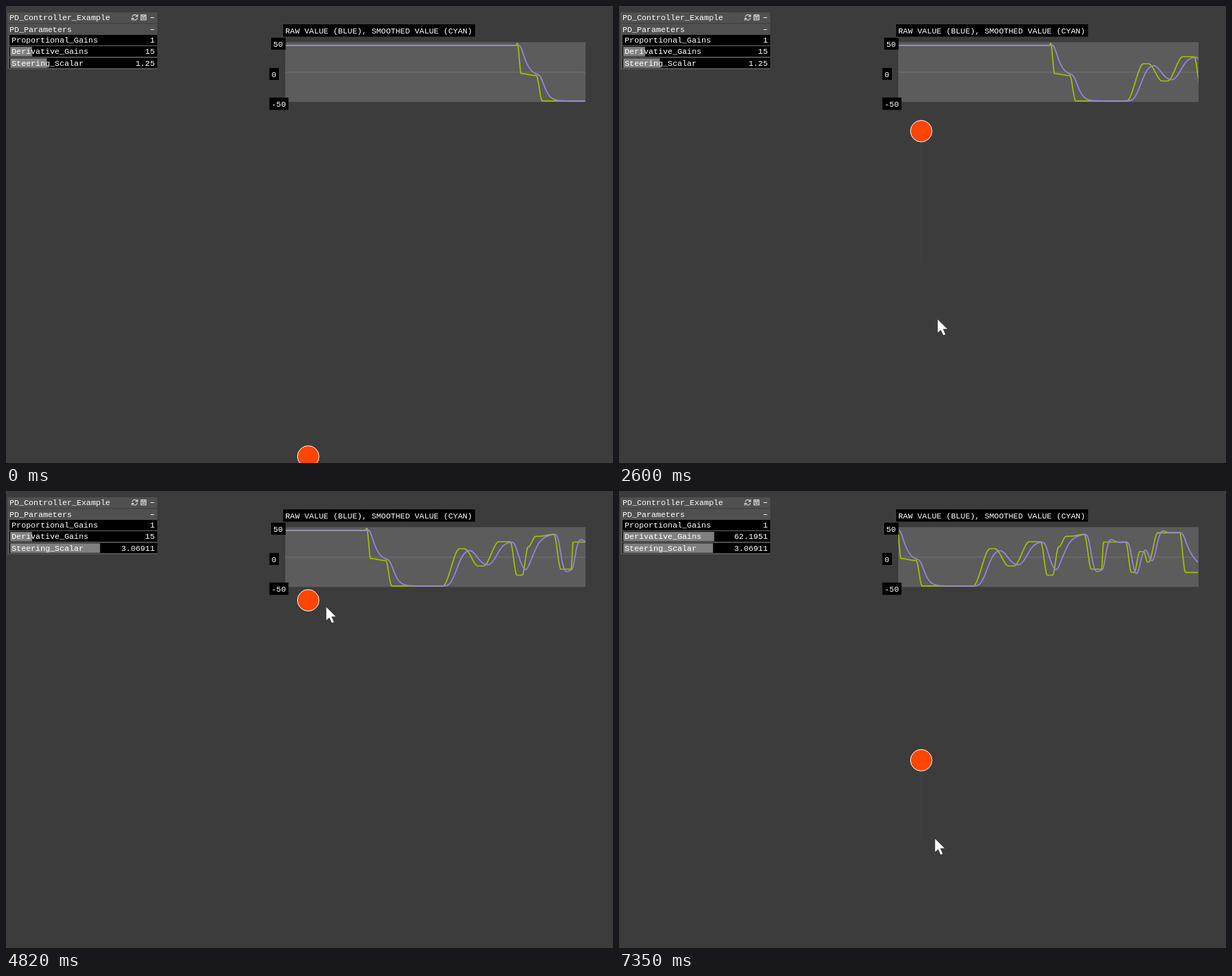
These frames come from a looping animation (863 px wide and 649 px high, 7.39 s). An HTML page:

```html
<!DOCTYPE html>
<html lang="en">
<head>
<meta charset="utf-8">
<title>PD controller</title>
<style>
html, body { margin: 0; width: 100%; height: 100%; overflow: hidden; background: #3c3c3c; }
svg { display: block; }
text { font: 11.37px "Liberation Mono", "DejaVu Sans Mono", monospace; fill: #fff; white-space: pre; }
.end { text-anchor: end; }
.icon { fill: none; stroke: #f0f0f0; stroke-width: 1.1; }
</style>
</head>
<body>
<svg width="863" height="649" viewBox="0 0 863 649">
  <defs><clipPath id="window"><rect x="397" y="51" width="426.5" height="86"/></clipPath></defs>
  <rect width="863" height="649" fill="#3c3c3c"/>

  <path id="link" stroke="#464646" fill="none"/>
  <circle id="ball" cx="429.7" r="15.3" fill="#ff4500" stroke="#fff"/>

  <rect x="397" y="51.3" width="427" height="85" fill="#fff" opacity=".164"/>
  <path d="M397 94H824" stroke="#737373"/>
  <g clip-path="url(#window)">
    <g id="curves" fill="none" stroke-width="1.7" stroke-linejoin="round">
      <path id="rawCurve" stroke="#a3c000"/>
      <path id="smoothCurve" stroke="#9a84da"/>
    </g>
  </g>
  <path d="M394 26h273v17.500h-273zM377 45h20.500v17h-20.500zM374.500 88h13.500v17h-13.500zM374.500 130h27v17.500h-27z"/>
  <text x="397" y="38.500">RAW VALUE (BLUE), SMOOTHED VALUE (CYAN)</text>
  <text x="380" y="57.500">50</text>
  <text x="377.500" y="100.500">0</text>
  <text x="377.500" y="143">-50</text>

  <rect x="2" y="9" width="213" height="81" fill="#505050"/>
  <path d="M2 24.800H215" stroke="#3c3c3c"/>
  <path d="M5 41h210v15h-210zM5 57h210v15h-210zM5 73.500h210v15h-210z"/>
  <path d="M5 56.500H215M5 72.800H215M5 89H215" stroke="#6c6c6c" stroke-width=".8"/>
  <rect id="derivativeBar" x="6" y="58" height="13.500" fill="#808080"/>
  <rect id="steeringBar" x="6" y="74.300" height="13.500" fill="#808080"/>
  <text x="5" y="19.500">PD_Controller_Example</text>
  <text x="5" y="36.500">PD_Parameters</text>
  <text x="8" y="52">Proportional_Gains</text>
  <text x="8" y="68">Derivative_Gains</text>
  <text x="8" y="84.500">Steering_Scalar</text>
  <text class="end" x="211.500" y="52">1</text>
  <text class="end" x="211.500" y="68" id="derivativeValue"></text>
  <text class="end" x="211.500" y="84.500" id="steeringValue"></text>
  <path class="icon" d="M179.500 15.500a3.600 3.600 0 0 1 6.500-1.500M187 12v3h-3M186.700 17a3.600 3.600 0 0 1-6.500 1.500M179 20.500v-3h3M192 12.700h7v7h-7zM194 13v2.500h3V13M193.500 17.500h4M205.500 16.500h5M205.500 33.500h5"/>

  <circle id="press" r="15.500" fill="#b6c22c" opacity=".72"/>
  <path id="cursor" d="M0 0V20L4.600 16L8.200 23.700L11.700 22.200L8.300 14.600H14.700Z" fill="#fff" stroke="#222" stroke-width=".7"/>
</svg>
<script>
// Time is measured in plot pixels: the plot scrolls left by one pixel per unit.
const LOOP = 7390, LEFT = 397, RIGHT = 823, END = 1156;
const TOP = 51, SCALE = 649 / 85, FLOOR = 134.8;
const CURSOR_LEAD = 1.5, BAR_LAG = 1.64;

// The recording does not scroll quite evenly: [milliseconds, pixels].
const scrollKeys = [[0, 0], [1840, 82.5], [3330, 142.5], [4200, 183.5], [5520, 248.5], [6480, 294], [7350, 331.5]];

// Mouse moves: [start, duration, plot height reached, x reached]
const rest = { level: 56, x: 452 };
const moves = [
  [725, 2, 53, 452],
  [727, 5.5, 96, 452],
  [733, 20, 98.7, 452],
  [754, 8.5, FLOOR, 452],
  [835, 24, 82, 463],
  [866, 19.5, 106.5, 463],
  [893, 22, 72, 463],
  [931, 9.5, 119.5, 450],
  [948, 8.5, 79.5, 380],
  [956.5, 11, 64.3, 77],
  [973, 20, 61.5, 133.675],
  [993, 10, 111, 424],
  [1017.5, 3, 72.5, 455],
  [1052, 8, 115.5, 450],
  [1064, 8, 86, 450],
  [1077.5, 5.5, 101, 442],
  [1084.5, 13, 59.3, 50],
  [1113, 11, 59, 135.3658],
  [1128.5, 8.5, 115.6, 449]
];
const sliders = {
  steering: { from: 973, to: 993, startX: 58, max: 5 },
  derivative: { from: 1113, to: 1124, startX: 37.2, max: 100 }
};

const clamp = f => Math.min(1, Math.max(0, f));
const ease = f => f * f * (3 - 2 * f);
const mix = (a, b, f) => a + (b - a) * f;
const stageY = level => (level - TOP) * SCALE;

function mouse(u) {
  let { level, x } = rest;
  for (const [start, duration, nextLevel, nextX] of moves) {
    const f = ease(clamp((u - start) / duration));
    level = mix(level, nextLevel, f);
    x = mix(x, nextX, f);
  }
  return { level, x };
}

function barEnd({ from, to, startX }, u) {
  const dragged = u - BAR_LAG;
  return dragged < from ? startX : mouse(Math.min(dragged, to)).x;
}

const sliderValue = (slider, u) => (barEnd(slider, u) - 6) / 208 * slider.max;

// A damped spring follows the mouse; both sliders act on it while it runs.
function simulate(dt) {
  const track = [];
  let position = rest.level, velocity = 0;
  for (let u = LEFT; u <= END; u += dt) {
    track.push(position);
    const pull = 0.0305 * sliderValue(sliders.steering, u) * (mouse(u).level - position);
    const drag = 0.0242 * sliderValue(sliders.derivative, u) * velocity;
    velocity += (pull - drag) * dt;
    position += velocity * dt;
  }
  return track;
}

const DT = 0.25;
const track = simulate(DT);

function smooth(u) {
  const at = (u - LEFT) / DT, i = Math.floor(at);
  return mix(track[i], track[i + 1], at - i);
}

function scrollAt(ms) {
  let i = 0;
  while (i < scrollKeys.length - 2 && ms >= scrollKeys[i + 1][0]) i++;
  const [t0, s0] = scrollKeys[i], [t1, s1] = scrollKeys[i + 1];
  return mix(s0, s1, clamp((ms - t0) / (t1 - t0)));
}

const el = Object.fromEntries([...document.querySelectorAll("[id]")].map(e => [e.id, e]));
const set = (name, attrs) => {
  for (const key in attrs) el[name].setAttribute(key, attrs[key]);
};
const visibility = shown => shown ? "visible" : "hidden";

function curve(levelAt) {
  const points = [];
  for (let u = LEFT; u < END - 1; u += 0.5) points.push(`${u} ${levelAt(u).toFixed(2)}`);
  return "M" + points.join("L");
}

function draw(ms) {
  const scroll = scrollAt(ms), now = RIGHT + scroll;
  const ballY = stageY(smooth(now));
  const tip = mouse(now + CURSOR_LEAD);
  const transform = `translate(${tip.x} ${stageY(tip.level)})`;
  const pressed = Object.values(sliders).some(s => now >= s.from && now <= s.to);

  set("curves", { transform: `translate(${-scroll} 0)` });
  set("ball", { cy: ballY });
  set("link", { d: `M429.7 ${ballY}V${stageY(mouse(now).level)}` });
  set("cursor", { transform, visibility: visibility(tip.level < FLOOR - 0.4) });
  set("press", { transform, visibility: visibility(pressed) });
  for (const name in sliders) {
    set(name + "Bar", { width: barEnd(sliders[name], now) - 6 });
    el[name + "Value"].textContent = +sliderValue(sliders[name], now).toPrecision(6);
  }
}

set("rawCurve", { d: curve(u => mouse(u).level) });
set("smoothCurve", { d: curve(smooth) });

const start = performance.now();
function tick() {
  draw((performance.now() - start) % LOOP);
  requestAnimationFrame(tick);
}
tick();
</script>
</body>
</html>
```
